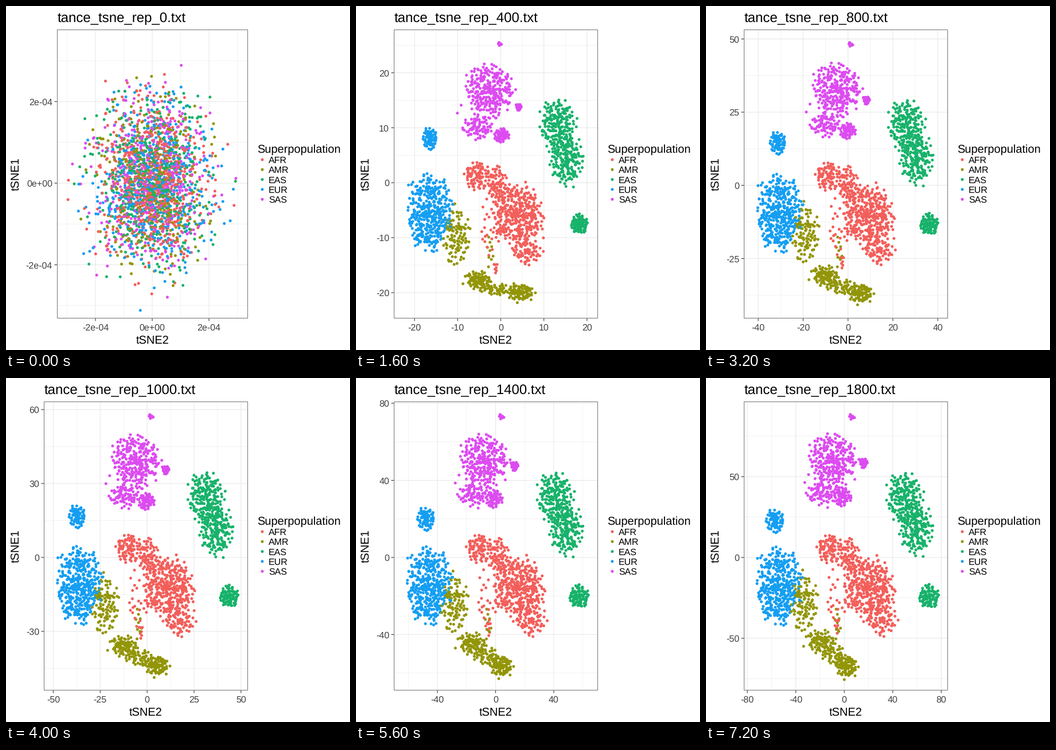
A matplotlib script for the animation above (8000 ms loop, 600x600 px).

```python
import numpy as np
import matplotlib.pyplot as plt
from matplotlib.animation import FuncAnimation
from matplotlib.patches import Rectangle

plt.rcParams["font.family"] = "Liberation Sans"
plt.rcParams["text.hinting"] = "none"

SIZE, PX = 600, 0.72          # stage size; points per pixel at 100 dpi
RIGHT, TOP, BOTTOM = 421.5, 41.5, 544.5
FRAMES = 10
GOLDEN = np.pi * (3 - 5 ** 0.5)
AFR, AMR, EAS, EUR, SAS = range(5)
NAMES = ["AFR", "AMR", "EAS", "EUR", "SAS"]
COLORS = np.array(["#F35E5A", "#929505", "#17B26A", "#149EF2", "#DC4BF0"])
GREY = "#404040"

# tick distance in each frame
X_STEPS = [2e-4, 5, 10, 20, 20, 25, 30, 40, 40, 40]
Y_STEPS = [2e-4, 5, 10, 20, 25, 30, 30, 40, 40, 50]

rng = np.random.default_rng(7)
groups, early_pts, late_pts = [], [], []


def blob(group, n, early, late, radii, squash=(1, 1)):
    """Evenly spread points whose centre goes from early to late."""
    k = np.arange(n)
    r = ((k + 0.5) / n) ** 0.62
    unit = np.column_stack([r * np.cos(k * GOLDEN), r * np.sin(k * GOLDEN)])
    offset = (unit + rng.normal(0, 0.12, unit.shape)) * radii
    groups.append(np.full(n, group))
    early_pts.append(early + offset * squash)
    late_pts.append(late + offset)


blob(AFR, 380, (281, 364), (285, 368), (42, 50))
blob(AFR, 95, (208, 295), (216, 298), (22, 25))
blob(AFR, 80, (243, 312), (250, 313), (16, 31))
blob(AFR, 75, (292, 433), (307, 423), (27, 26), (1, 0.7))
blob(AFR, 24, (238, 390), (226, 385), (20, 55))
blob(AFR, 7, (255, 475), (229, 430), (4, 16), (1, 0.4))

blob(AMR, 105, (178, 410), (171, 392), (23, 48))
blob(AMR, 90, (223, 493), (200, 461), (25, 20), (0.8, 0.6))
blob(AMR, 45, (260, 503), (224, 484), (20, 17), (1.4, 0.3))
blob(AMR, 98, (318, 497), (245, 503), (18, 18), (1.5, 0.6))
blob(AMR, 9, (237, 430), (229, 430), (6, 32))

blob(EAS, 200, (356, 205), (346, 209), (29, 41))
blob(EAS, 204, (367, 272), (366, 264), (27, 41))
blob(EAS, 100, (390, 380), (389, 382), (17, 20), (0.7, 0.7))

blob(EUR, 400, (130, 356), (127, 360), (36, 62))
blob(EUR, 27, (122, 405), (122, 410), (24, 22))
blob(EUR, 76, (136, 217), (121, 249), (16, 20), (0.6, 0.9))

blob(SAS, 280, (243, 150), (222, 143), (40, 42))
blob(SAS, 75, (222, 221), (202, 200), (24, 20))
blob(SAS, 70, (266, 240), (238, 207), (13, 16), (0.8, 0.5))
blob(SAS, 35, (291, 198), (275, 148), (7, 9), (0.4, 0.4))
blob(SAS, 9, (248, 65), (254, 68), (5, 4), (0.3, 0.3))
blob(SAS, 20, (222, 190), (214, 182), (48, 42))

groups = np.concatenate(groups)
order = rng.permutation(len(groups))
groups = groups[order]
early, late = (np.concatenate(p)[order] for p in (early_pts, late_pts))

# first frame: one round normal cloud with its tail cut off
radius = np.sqrt(-2 * np.log(1 - 0.995 * rng.random(len(groups))))
angle = rng.uniform(0, 2 * np.pi, len(groups))
start = np.column_stack([255 + 46 * radius * np.cos(angle),
                         309 + 69 * radius * np.sin(angle)])


def positions(i):
    if i == 0:
        return start
    return early + (late - early) * ((i - 1) / 8) ** 0.4


def scales(i):
    """Pixel of zero and pixels per unit, for x and for y."""
    if i == 0:
        return (255, 49.5e4), (309, 71.2e4)
    if i == 1:
        return (252.3, 19.15), (315, 24.53)
    growth = (i - 0.85) / 1.15
    zero_x = 252.5 - 11.3 * ((i - 2) / 7) ** 0.68
    zero_y = 313 - 4.8 * 0.2 ** (i - 2)
    return (zero_x, 7.52 * growth ** -0.648), (zero_y, 9.585 * growth ** -0.625)


fig = plt.figure(figsize=(6, 6), dpi=100, facecolor="white")
ax = fig.add_axes([0, 0, 1, 1])


def line(xs, ys, color, width, z=1):
    ax.plot(xs, ys, color=color, lw=width * PX, zorder=z,
            solid_capstyle="butt", snap=False)


def label(x, y, text, size, color="black", **kw):
    ax.text(x, y, text, fontsize=size * PX, color=color, va="baseline", zorder=5, **kw)


def ticks(zero, scale, step, low, high):
    """Yield (pixel, text, is_major) for the gridlines between two pixels."""
    for k in range(-8, 9):
        value = k * step / 2
        pixel = zero + value * scale
        if low < pixel < high:
            yield pixel, f"{value:.0e}" if step < 1 else f"{value:.0f}", k % 2 == 0


def grid_style(major):
    return ("#E8E8E8", 1.1, 1) if major else ("#EBEBEB", 0.6, 0.5)


def draw_axes(i, left):
    (zero_x, scale_x), (zero_y, scale_y) = scales(i)
    for x, text, major in ticks(zero_x, scale_x, X_STEPS[i], left, RIGHT):
        line([x, x], [TOP, BOTTOM], *grid_style(major))
        if major:
            line([x, x], [BOTTOM, BOTTOM + 5], "#333333", 1.1)
            label(x, 566, text, 16, GREY, ha="center")
    for y, text, major in ticks(zero_y, -scale_y, Y_STEPS[i], TOP, BOTTOM):
        line([left, RIGHT], [y, y], *grid_style(major))
        if major:
            line([left - 5, left], [y, y], "#333333", 1.1)
            label(left - 8.5, y + 6, text, 16, GREY, ha="right")
    ax.add_patch(Rectangle((left, TOP), RIGHT - left, BOTTOM - TOP, fill=False,
                           ec="#7F7F7F", lw=1.1 * PX, zorder=4, snap=False))
    label((left + RIGHT) / 2, 590, "tSNE2", 20, ha="center")
    label(24, 293, "tSNE1", 20, ha="center", rotation=90, rotation_mode="anchor")


def dots(x, y, colors):
    ax.scatter(x, y, s=(5 * PX) ** 2, c=colors, linewidths=0, zorder=3)


def draw_legend():
    label(438.5, 256, "Superpopulation", 20)
    rows = 268 + 17.3 * np.arange(5)
    dots(np.full(5, 447), rows, COLORS)
    for y, name in zip(rows, NAMES):
        label(458, y + 6, name, 16)


def update(i):
    ax.clear()
    ax.set_xlim(0, SIZE)
    ax.set_ylim(SIZE, 0)
    ax.axis("off")
    left = {0: 89.5, 1: 61.5}.get(i, 66.5)
    draw_axes(i, left)
    label(left, 28, f"tance_tsne_rep_{200 * i}.txt", 24)
    draw_legend()
    dots(*positions(i).T, COLORS[groups])
    return []


anim = FuncAnimation(fig, update, frames=FRAMES, interval=800,
                     init_func=lambda: update(0), repeat=True, repeat_delay=0)
plt.show()
```
